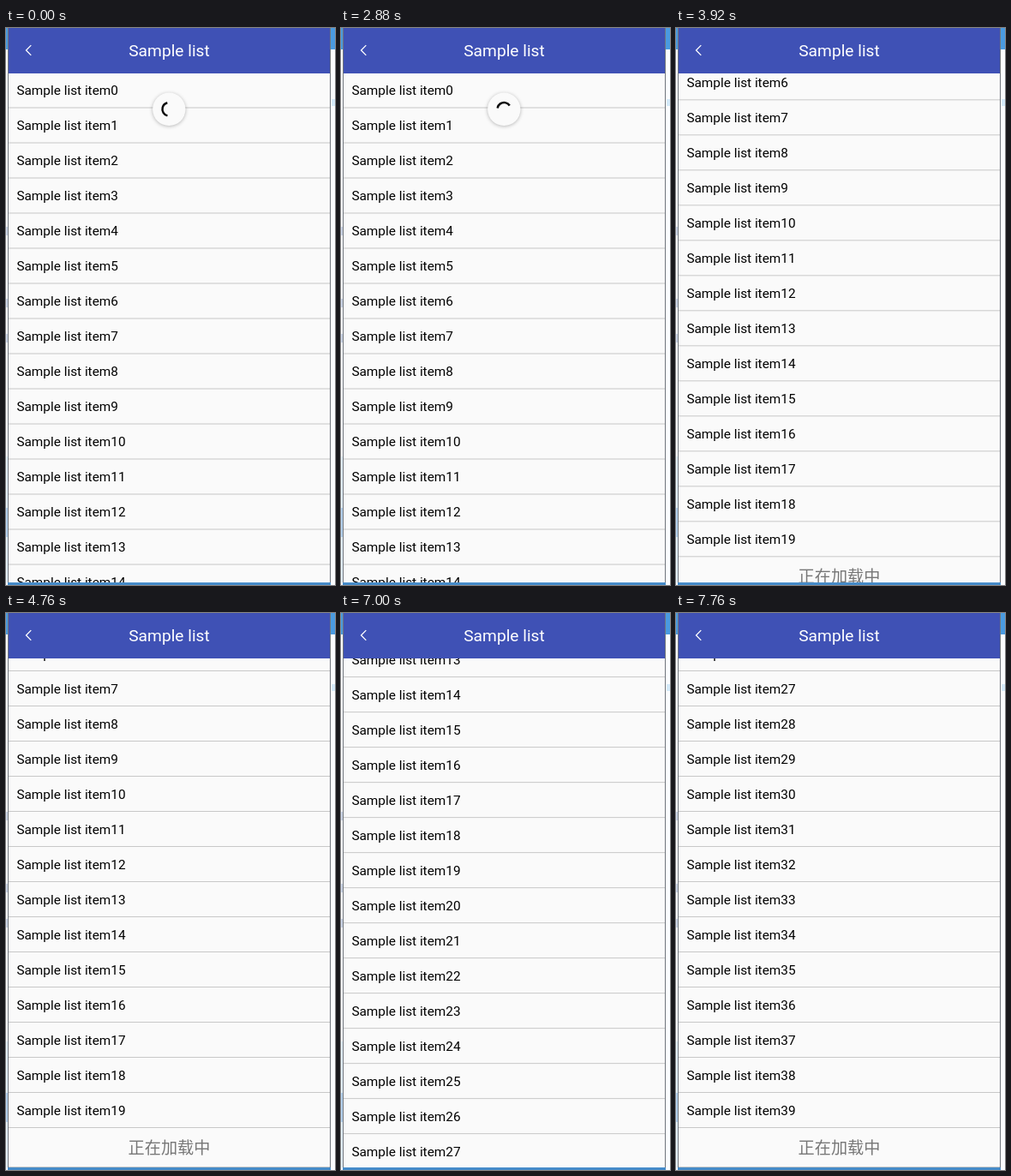
An HTML page with a canvas that plays this animation: 384 by 650 pixels, repeating every 8 s.

```html
<!DOCTYPE html>
<html lang="en">
<head>
<meta charset="utf-8">
<title>Sample list</title>
<style>
html, body { margin: 0; width: 100%; height: 100%; overflow: hidden; background: #fff; }
canvas { display: block; }
</style>
</head>
<body>
<canvas id="stage" width="384" height="650"></canvas>
<script>
const ctx = document.getElementById('stage').getContext('2d');
const LOOP = 8000, ROW = 41, PAGE = 20, MORE_AT = 6240, TOP = 53;
const SPIN_END = 3400, SPIN_OUT = 150;
const CYCLE = 1152, PHASE = 0.74; // spinner period and its phase at time 0

// [time, scroll offset]
const scrollKeys = [
  [0, 0], [3560, 0], [3720, 119.5], [3880, 238], [3960, 271.5],
  [6760, 271.5], [7000, 550.5], [7280, 792.5], [7560, 1091.5], [LOOP, 1091.5]
];

function scrollAt(t) {
  const i = scrollKeys.findIndex(k => k[0] > t);
  const [t0, a] = scrollKeys[i - 1], [t1, b] = scrollKeys[i];
  return a + (b - a) * (t - t0) / (t1 - t0);
}

function rect(x, y, w, h, color) {
  ctx.fillStyle = color;
  ctx.fillRect(x, y, w, h);
}

function text(str, x, y, font, color, align) {
  ctx.font = font;
  ctx.fillStyle = color;
  ctx.textAlign = align;
  ctx.fillText(str, x, y);
}

function drawBackdrop() {
  rect(0, 0, 384, 650, '#fbfdff');
  rect(0, 0, 384, 25, '#4a9be0');
  for (const y of [237, 321, 362]) rect(0, y - 5, 2, 10, '#cdd6e8');
  rect(0, 500, 2, 147, '#e4f0fa');
  rect(0, 560, 2, 34, '#b5d2ef');
  rect(380, 83, 4, 8, '#d5ebfa');
  rect(2, 647, 377, 3, '#458bc9');
}

function drawList(t) {
  const scroll = scrollAt(t);
  const count = t < MORE_AT ? PAGE : 2 * PAGE;
  ctx.save();
  ctx.beginPath();
  ctx.rect(3, TOP, 375, 647 - TOP);
  ctx.clip();
  rect(3, TOP, 375, 647 - TOP, '#fafafa');
  const first = Math.max(0, Math.floor(scroll / ROW) - 1);
  for (let i = first; i < Math.min(count, first + 18); i++) {
    const y = i * ROW - scroll;
    text('Sample list item' + i, 12.4, Math.round(78 + y), '15.36px Roboto, sans-serif', '#000', 'left');
    rect(3, 92.5 + y, 375, 1, '#c8c8c8');
  }
  const foot = count * ROW - scroll;
  text('正在加载中', 190.5, Math.round(82.5 + foot), '19.2px "Noto Sans CJK SC", "Noto Sans CJK", sans-serif', '#777', 'center');
  rect(3, 97.5 + foot, 375, 1, '#c8c8c8');
  ctx.restore();
}

function drawHeader() {
  rect(3, 0, 375, TOP, '#3f51b5');
  text('Sample list', 190.5, 33, '19.2px Roboto, sans-serif', '#fff', 'center');
  ctx.strokeStyle = '#fff';
  ctx.lineWidth = 1.3;
  ctx.beginPath();
  ctx.moveTo(29.3, 20.1);
  ctx.lineTo(23.5, 26);
  ctx.lineTo(29.3, 31.9);
  ctx.stroke();
}

function drawSpinner(t) {
  const scale = Math.min(1, 1 - (t - SPIN_END) / SPIN_OUT);
  if (scale <= 0) return;
  ctx.save();
  ctx.translate(190.3, 94.8);
  ctx.scale(scale, scale);
  ctx.shadowColor = 'rgba(0,0,0,.28)';
  ctx.shadowBlur = 4;
  ctx.shadowOffsetY = 0.8;
  ctx.fillStyle = '#fafafa';
  ctx.beginPath();
  ctx.arc(0, 0, 19.2, 0, 7);
  ctx.fill();
  ctx.shadowColor = 'transparent';

  // The head runs ahead in the first half of a cycle, the tail follows in the second.
  const p = t / CYCLE + PHASE, n = Math.floor(p), f = p - n;
  const ease = x => x * x * (3 - 2 * x);
  const base = 88.8 + 280.8 * n + 326.8 * p;
  const tail = base + 280.8 * ease(Math.max(0, f * 2 - 1));
  const head = base + 3.6 + 280.8 * ease(Math.min(1, f * 2));
  ctx.strokeStyle = '#0a0a0a';
  ctx.lineWidth = 2.5;
  ctx.beginPath();
  ctx.arc(0, 0, 7.8, tail * Math.PI / 180, head * Math.PI / 180);
  ctx.stroke();
  ctx.restore();
}

function draw(now) {
  const t = now % LOOP;
  drawBackdrop();
  drawList(t);
  drawSpinner(t);
  drawHeader();
  rect(2, 0, 1, 647, '#70757c');
  rect(378, 0, 1, 647, '#70757c');
}

const start = performance.now();
function tick() {
  draw(performance.now() - start);
  requestAnimationFrame(tick);
}
tick();
</script>
</body>
</html>
```
